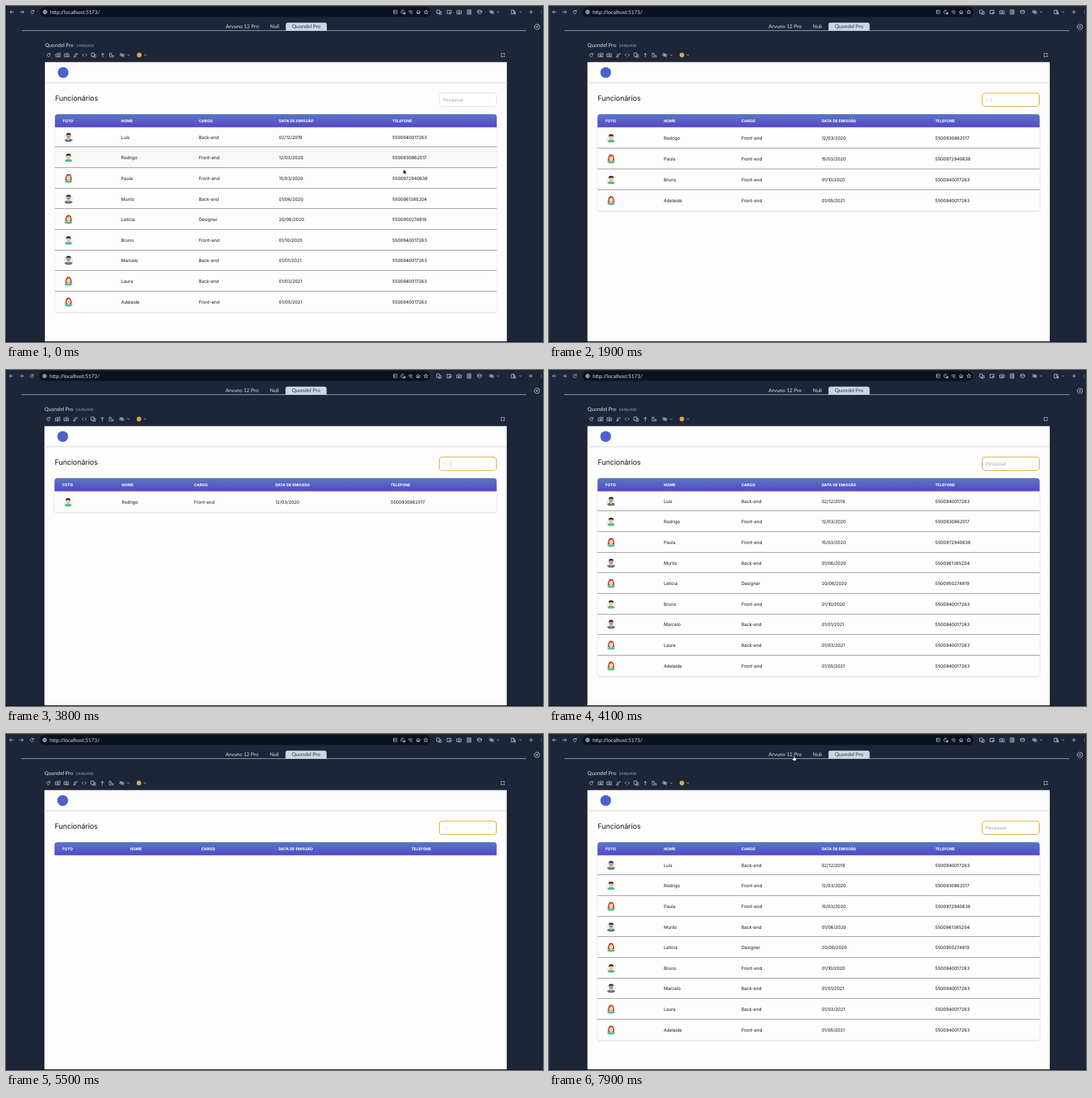
These frames come from a looping animation (800x500 px, 8 s). An HTML page:

```html
<!DOCTYPE html>
<html lang="pt">
<head>
<meta charset="utf-8">
<title>Funcionários</title>
<style>
html, body { margin: 0; width: 100%; height: 100%; overflow: hidden; background: #0a0f1a; }
svg { display: block; }
text { font-family: Inter, sans-serif; font-size: 6.6px; fill: #111; text-rendering: geometricPrecision; white-space: pre; }
.ui { font-family: Lato, sans-serif; font-size: 7.7px; fill: #dbe1ea; }
.head { font-size: 5.7px; font-weight: 700; fill: #fff; }
.icon { fill: none; stroke: #cbd3de; stroke-width: .8; stroke-linecap: round; stroke-linejoin: round; }
</style>
</head>
<body>
<svg id="stage" width="800" height="500" viewBox="0 0 800 500">
  <defs>
    <linearGradient id="bar" x2="0" y2="1">
      <stop offset="0" stop-color="#5878c2"/><stop offset="1" stop-color="#5447c8"/>
    </linearGradient>
    <filter id="soft" x="-5%" y="-20%" width="110%" height="150%">
      <feDropShadow dx="0" dy="1" stdDeviation="1" flood-color="#000" flood-opacity=".2"/>
    </filter>
    <clipPath id="round"><circle r="7.3"/></clipPath>
    <g id="suit" clip-path="url(#round)">
      <circle r="7.3" fill="#f4f3f2"/>
      <path d="M-7 6.6V5Q-6.2 3-2 2.2H2Q6.2 3 7 5V6.6Z" fill="#5d7f7b"/>
      <path d="M-1.6 1.8H1.6L0 4.6Z" fill="#f0ece8"/>
      <ellipse cy="-1.3" rx="2.9" ry="3.6" fill="#d9a47c"/>
      <path d="M-3.5-2Q-4.4-6.7 0-6.8Q4.4-6.7 3.5-2L2.8-3.7H-2.8Z" fill="#34383c"/>
      <path d="M-2.7-1.4H2.7" stroke="#5a4c44" stroke-width=".7" opacity=".6"/>
    </g>
    <g id="shirt" clip-path="url(#round)">
      <circle r="7.3" fill="#f4f3f2"/>
      <path d="M-5.6 6.6V5Q-5 2.9-1.5 2.2H1.5Q5 2.9 5.6 5V6.6Z" fill="#55bd92"/>
      <path d="M-1.4 1H1.4V2.8L0 3.8L-1.4 2.8Z" fill="#e9b08c"/>
      <ellipse cy="-1.1" rx="2.7" ry="3.2" fill="#f2c09c"/>
      <path d="M-3.3-1.2Q-4.6-5.7 0-5.8Q4.6-5.7 3.3-1.2L2.4-3H-2.4Z" fill="#2c2422"/>
    </g>
    <g id="woman" clip-path="url(#round)">
      <circle r="7.3" fill="#f4f3f2"/>
      <path d="M-5 2.6Q-4.6-6.7 0-6.8Q4.6-6.7 5 2.6Q3 3.6 0 3.2Q-3 3.6-5 2.6Z" fill="#b9502d"/>
      <path d="M-6.8 6.8V5.2Q-6 3.4-2 2.8H2Q6 3.4 6.8 5.2V6.8Z" fill="#55bd92"/>
      <path d="M-1.6 1H1.6V3.2L0 4.8L-1.6 3.2Z" fill="#f0bd9c"/>
      <ellipse cy="-1" rx="3" ry="3.5" fill="#f8d1b4"/>
      <path d="M-3.2-1Q-2.4-3.6 1-4.4Q2.6-3.4 3.2-1Q4-6 0-6Q-4-6-3.2-1Z" fill="#b9502d"/>
    </g>
  </defs>
  <g id="scene">
    <rect width="802" height="499" fill="#1d2638"/>
    <rect x="50" y="1.5" width="582" height="14.8" rx="7.4" fill="#0a111f"/>
    <text class="ui" x="65" y="11.6">http://localhost:5173/</text>
    <path d="M23 36.6H775" stroke="#aeb6c3" stroke-width=".9"/>
    <path d="M416.4 37V28Q416.4 24.7 419.7 24.7H474.3Q477.6 24.7 477.6 28V37Z" fill="#cfd6e1"/>
    <g text-anchor="middle">
      <text class="ui" x="351.7" y="33.2">Arvuno 12 Pro</text>
      <text class="ui" x="399.8" y="33.2">Nuli</text>
      <text class="ui" x="447" y="33.2" style="fill:#2c384c">Quondel Pro</text>
    </g>
    <text class="ui" x="57.3" y="60.5">Quondel Pro</text>
    <text class="ui" x="104" y="60.5" style="font-size:5.75px;fill:#9aa4b4">1440x900</text>
    <g id="icons" class="icon"></g>
    <circle cx="198" cy="73" r="3.4" fill="#d9a653"/>

    <rect x="57.3" y="83.5" width="688.7" height="415.5" fill="#fdfdfd"/>
    <rect x="57.3" y="113.4" width="688.7" height="1.1" fill="#dcdcdc"/>
    <rect x="57.3" y="114.5" width="688.7" height="1.5" fill="#f3f3f3"/>
    <circle cx="84.5" cy="99" r="8" fill="#4c60cf"/>
    <text x="72.5" y="141.3" style="font-size:10.6px">Funcionários</text>
    <rect id="box" x="645.5" y="129.5" width="85" height="20" rx="4.5" fill="#fff"/>
    <g fill="none" stroke="#f1f1f3" stroke-width=".8"><circle cx="720.5" cy="138.5" r="2.2"/><path d="M722.2 140.2L724 142"/></g>
    <text id="query" x="650.7" y="141.9"></text>
    <path id="caret" stroke="#b9bac8" stroke-width=".6"/>
    <g id="table"></g>
  </g>
  <g id="arrow"><path d="M0 0V7.4L1.8 5.8L3 8.4L4.2 7.9L3 5.4H5.3Z" fill="#000" stroke="#fff" stroke-width=".6"/></g>
  <g id="beam"><path d="M-1.5-4Q0-4 0-3V3Q0 4 1.5 4M1.5-4Q0-4 0-3M0 3Q0 4-1.5 4" fill="none" stroke="#222" stroke-width=".7"/></g>
  <g id="hand"><path d="M-.8-2.5Q0-3.5.8-2.5V.2L3.2.9Q3.8 1.2 3.6 2.2L2.9 4.8H-1L-3 2Q-3 1-1.8 1.4L-.8 2Z" fill="#fff" stroke="#111" stroke-width=".6"/></g>
</svg>
<script>
const $ = id => document.getElementById(id);
const LOOP = 8000;

const shapes = {
  back: 'M2.7 0H-2.7M-.5-2.2L-2.7 0L-.5 2.2',
  next: 'M-2.7 0H2.7M.5-2.2L2.7 0L.5 2.2',
  reload: 'M2-1.4A2.4 2.4 0 1 0 2.3.7M2.3-2.7V-1.1H.7',
  globe: 'M-2.8 0A2.8 2.8 0 1 0 2.8 0A2.8 2.8 0 1 0-2.8 0H2.8M0-2.8Q-2.4 0 0 2.8Q2.4 0 0-2.8',
  store: 'M-2.6-2.3Q0-3.5 2.2-2.3V0M-2.6-2.3V2.2Q-1.5 3 0 2.8M-2.6 0H.8M1.2 2H3',
  cookie: 'M1-2.7A2.8 2.8 0 1 0 2.5 0M-1-.8H0M1 1.2H3V3H1Z',
  wifi: 'M-3-1Q0-3.6 3-1M-1.8.6Q0-.9 1.8.6M0 2.2H2.5',
  home: 'M-2.8 0L0-2.6L2.8 0M-2-.4V2.5H-.6V.8H.6V2.5H2V-.4',
  star: 'M0-3L.9-1L3-.8L1.4.6L1.9 2.7L0 1.6L-1.9 2.7L-1.4.6L-3-.8L-.9-1Z',
  devices: 'M-3-3H1V2H-3ZM1-.5H3.2V3.2H-.5V2',
  inspect: 'M0 2.5H-3V-2.5H3V0M.3.3L1.3 3.3L2 2L3.3 1.4Z',
  camera: 'M-3.2-1.7H-1.5L-.8-2.7H.8L1.5-1.7H3.2V2.6H-3.2ZM-1.2.4A1.2 1.2 0 1 0 1.2.4A1.2 1.2 0 1 0-1.2.4',
  doc: 'M-2.5-3.2H2.5V3.2H-2.5ZM-1.2-1.5H1.2M-1.2 0H1.2M-1.2 1.5H1.2',
  layers: 'M0-3L3-1.5L0 0L-3-1.5ZM-3-1.5V1.2L0 2.8L3 1.2V-1.5',
  hide: 'M-3.5 0Q0-4 3.5 0Q0 4-3.5 0M-2.8-3L2.8 3M-1 0A1 1 0 1 0 1 0A1 1 0 1 0-1 0',
  down: 'M-1.2-.6L0 .6L1.2-.6',
  panel: 'M-3-2.8H0V2.8H-3ZM0-2.2L1.3-2.5L3 2.5L1.3 2.8M1.3 0V2.8H3',
  plus: 'M-2.3 0H2.3M0-2.3V2.3',
  dots: 'M0-2V-1.9M0 0V.1M0 2V2.1',
  close: 'M-4 0A4 4 0 1 0 4 0A4 4 0 1 0-4 0M-1.6-1.6L1.6 1.6M1.6-1.6L-1.6 1.6',
  pen: 'M-2.8 2.8L-1.6.2L0 1.7ZM-.3-.6L1.8-2.8L2.8-1.8L.7.4M-2-1L-.8-2',
  code: 'M-1.3-1.8L-3.2 0L-1.3 1.8M1.3-1.8L3.2 0L1.3 1.8',
  up: 'M0 2.8V-2.6M-2.1-.6L0-2.6L2.1-.6',
  ruler: 'M-2.8-2.8H-.6V.7H2.8V2.8H-2.8Z',
  grid: 'M-2.4-1.2V-2.4H-1.2ZM1.2-2.4H2.4V-1.2ZM2.4 1.2V2.4H1.2ZM-1.2 2.4H-2.4V1.2Z'
};
const bars = [
  [9, 'back 8 next 23 reload 38.5 globe 57.5 store 580 cookie 591.5 wifi 602.5 home 614 star 625.5 devices 645 inspect 660 camera 675 doc 690 layers 705.5 hide 723.5 down 733 panel 756 down 766 plus 782 dots 797.5'],
  [31, 'close 791'],
  [73, 'reload 63 camera 77 plus 80 camera 90 pen 103.5 code 116.5 devices 130 up 143.5 ruler 157 hide 172.5 down 182 down 207 grid 740']
];
$('icons').innerHTML = bars.map(([y, list]) => list.match(/\w+ [\d.]+/g).map(item => {
  const [name, x] = item.split(' ');
  const small = name === 'plus' && y === 73;
  return `<path transform="translate(${x} ${small ? y - 2.5 : y})${small ? ' scale(.4)' : ''}" d="${shapes[name]}"/>`;
}).join('')).join('');

const phone = '5500940017263';
const staff = [
  ['suit', 'Luís', 'Back-end', '02/12/2019', phone],
  ['shirt', 'Rodrigo', 'Front-end', '12/03/2020', '5500930862517'],
  ['woman', 'Paula', 'Front-end', '15/03/2020', '5500972940638'],
  ['suit', 'Murilo', 'Back-end', '01/06/2020', '5500961385204'],
  ['woman', 'Letícia', 'Designer', '20/06/2020', '5500950274819'],
  ['shirt', 'Bruno', 'Front-end', '01/10/2020', phone],
  ['suit', 'Marcelo', 'Back-end', '01/01/2021', phone],
  ['woman', 'Laura', 'Back-end', '01/03/2021', phone],
  ['woman', 'Adelaide', 'Front-end', '01/05/2021', phone]
];
const titles = ['FOTO', 'NOME', 'CARGO', 'DATA DE EMISSÃO', 'TELEFONE'];
const columns = {
  many: [84, 171, 286.7, 406.2, 575.3],
  one: [84, 172.5, 280, 401.2, 573],
  none: [84, 185, 291, 406, 604]
};

const keys = [
  [0, ''], [1600, 'R'], [1800, 'Ro'], [2100, 'Rod'], [2200, 'Rodr'], [2400, 'Rodri'], [2500, 'Rodrig'],
  [3600, 'Rodri'], [3700, 'Rodr'], [3800, 'Rod'], [3900, 'Ro'], [4000, 'R'], [4100, ''],
  [5200, 'x'], [5400, 'xi'], [6300, 'x'], [6400, '']
];

const label = (x, y, s, cls = '') => `<text class="${cls}" x="${x}" y="${y}">${s}</text>`;
const ease = (t, a, b) => {
  const p = Math.min(1, Math.max(0, (t - a) / (b - a)));
  return p * p * (3 - 2 * p);
};

function tableMarkup(rows, hover) {
  const n = rows.length;
  const xs = columns[n > 1 ? 'many' : n ? 'one' : 'none'];
  const h = n > 6 ? 30.65 : 31;
  const top = n > 6 ? 179.3 : 180.3;
  let out = n ? `<rect x="72.3" y="165" width="658.6" height="${top - 165 + n * h}" rx="4" fill="#fdfdfd" filter="url(#soft)"/>` : '';
  out += '<path d="M72.3 180.6V165Q72.3 160.9 76.4 160.9H726.8Q730.9 160.9 730.9 165V180.6Z" fill="url(#bar)"/>';
  out += titles.map((s, i) => label(xs[i], 172.8, s, 'head')).join('');
  rows.forEach(([face, ...cells], r) => {
    // Rows sit on whole pixels, as in a browser layout.
    const y = top + r * h;
    const end = Math.floor(y + h);
    const mid = Math.floor(y + 15.78) + .5;
    if (r === hover) out += `<rect x="72.3" y="${Math.floor(y) + 1}" width="658.6" height="${h - 1}" fill="#f8f8f8"/>`;
    out += `<use href="#${face}" x="92.5" y="${mid}"/>`;
    out += cells.map((s, i) => label(xs[i + 1], mid + 2.3, s)).join('');
    if (r < n - 1) out += `<rect x="72.3" y="${end}" width="658.6" height="1" fill="#999"/>`;
  });
  return out;
}

function pointer(t) {
  if (t < 1600) {
    const p = ease(t, 50, 780);
    return { x: 592 + 97 * p, y: 243 - 104 * p, kind: p > .92 ? 'beam' : 'arrow' };
  }
  if (t < 6850) return null;
  const p = ease(t, 6850, 7800);
  return { x: 689 - 324 * p, y: 139 - 104 * p, kind: p < .08 ? 'beam' : p > .96 ? 'hand' : 'arrow' };
}

let shown = '';
function draw(t) {
  const [since, word] = keys.filter(k => k[0] <= t).pop();
  const rows = staff.filter(row => row.slice(1).join(' ').toLowerCase().includes(word.toLowerCase()));
  const cur = pointer(t);
  const hover = cur && cur.y > 184 ? Math.floor((cur.y - 184) / 30.65) : -1;
  const state = word + '|' + hover;
  if (state !== shown) {
    shown = state;
    $('table').innerHTML = tableMarkup(rows, hover);
    $('query').textContent = word || 'Pesquisar';
    $('query').style.fill = word ? '#e2e2ea' : '#9fa0a3';
  }

  const focus = t >= 1100;
  $('box').setAttribute('stroke', focus ? '#eba338' : '#dcdcde');
  $('box').setAttribute('stroke-width', focus ? 1.2 : .9);

  const blink = word && t - since < 500;
  $('caret').style.display = blink ? '' : 'none';
  if (blink) $('caret').setAttribute('d', `M${651.2 + $('query').getComputedTextLength()} 136V143`);

  for (const kind of ['arrow', 'beam', 'hand']) {
    const on = cur && cur.kind === kind;
    $(kind).style.display = on ? '' : 'none';
    if (on) $(kind).setAttribute('transform', `translate(${cur.x} ${cur.y})`);
  }
  const slip = .7 * (1 - ease(t, 0, 700));
  $('scene').setAttribute('transform', `translate(${slip} 0) scale(${1 - slip / 1000} 1)`);
}

function tick() {
  draw(performance.now() % LOOP);
  requestAnimationFrame(tick);
}
tick();
</script>
</body>
</html>
```
